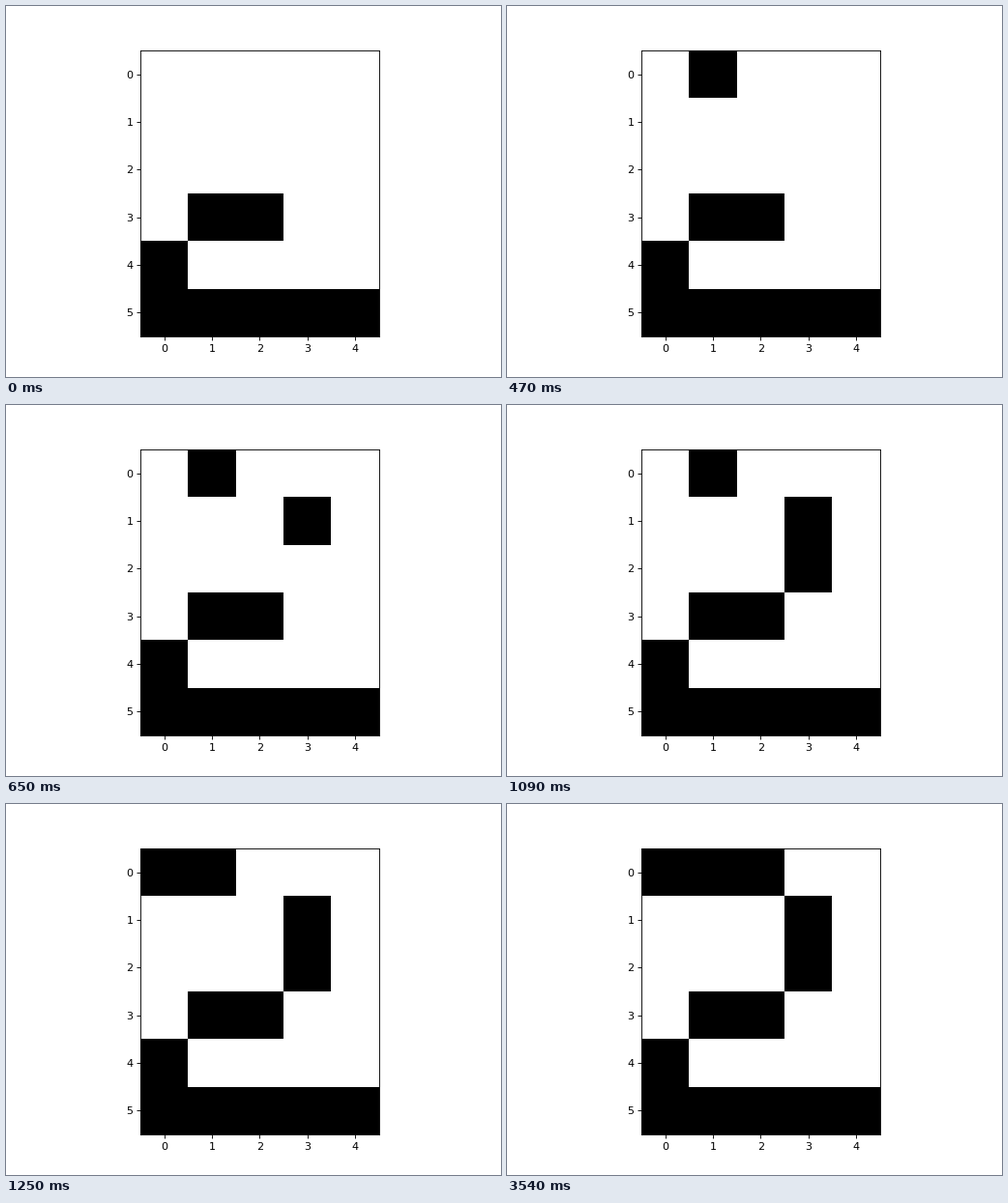
Animation of 512 by 384 pixels, one loop 5000 ms. Source, as a matplotlib script:

```python
import numpy as np
import matplotlib.pyplot as plt
from matplotlib.animation import FuncAnimation

ROWS, COLS = 6, 5
STEP = 50      # ms per frame
LOOP = 5000    # ms per loop

# When each missing cell of the digit turns black: ms -> (row, column)
FILLS = {200: (0, 1), 650: (1, 3), 850: (2, 3), 1250: (0, 0), 1350: (0, 2)}


def digit_two():
    grid = np.zeros((ROWS, COLS))
    grid[0, :3] = 1      # top bar
    grid[1:3, 3] = 1     # right side
    grid[3, 1:3] = 1     # middle bar
    grid[4, 0] = 1       # left side
    grid[5] = 1          # base
    return grid


def grid_at(ms):
    grid = digit_two()
    for start, cell in FILLS.items():
        grid[cell] = ms >= start
    return grid


fig, ax = plt.subplots(figsize=(6.4, 4.8), dpi=80)
image = ax.imshow(grid_at(0), cmap="binary", vmin=0, vmax=1,
                  interpolation="nearest")
ax.set_xticks(range(COLS))
ax.set_yticks(range(ROWS))


def update(frame):
    image.set_data(grid_at(frame * STEP))
    return [image]


anim = FuncAnimation(fig, update, frames=LOOP // STEP, interval=STEP,
                     repeat=True, repeat_delay=0, blit=False)
plt.show()
```
